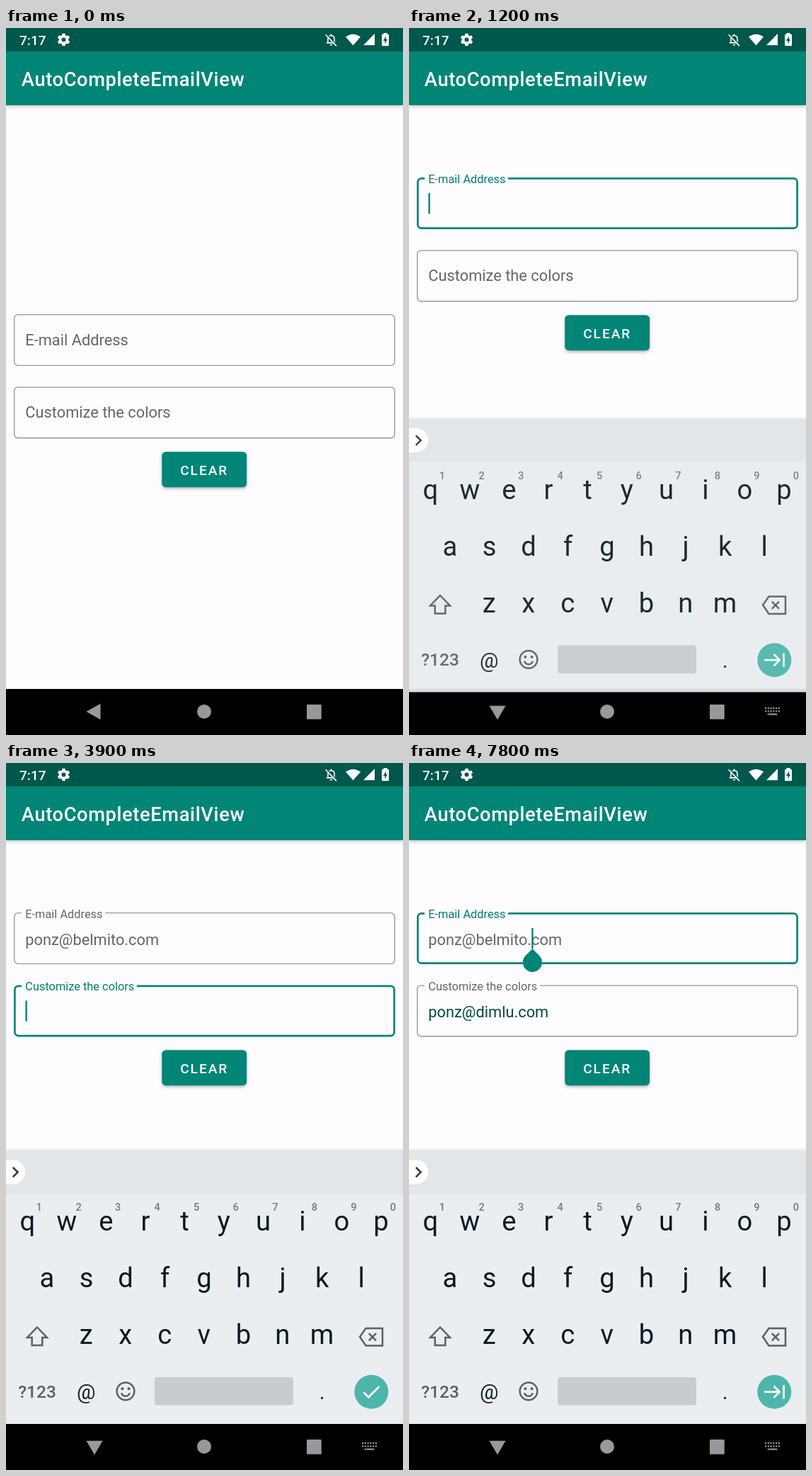
Animation, 561 px wide and 998 px high, one loop 8 s. Source, as an HTML page with a canvas:

```html
<!DOCTYPE html>
<html lang="en">
<head>
<meta charset="utf-8">
<title>AutoCompleteEmailView</title>
<style>
html, body { margin: 0; width: 100%; height: 100%; overflow: hidden; background: #fefcff; }
canvas { display: block; width: 561px; height: 998px; }
</style>
</head>
<body>
<canvas id="stage"></canvas>
<script>
const W = 561, H = 998, LOOP = 8000, STEP = 100;
const TEAL = '#008577', DARK_TEAL = '#00574b', PAPER = '#fefcff';
const GREY = '#666567', LINE = '#979699', ICON = '#566167', NAV = '#9a989c';
const BODY = 21.82, SMALL = 16.36, LEFT = 27.3;
const NAME = 'ponz';
const DOMAINS = ['belmito.com', 'dimlu.com'];

const canvas = document.getElementById('stage');
const ctx = canvas.getContext('2d');
const dpr = window.devicePixelRatio || 1;
canvas.width = W * dpr;
canvas.height = H * dpr;

const lerp = (a, b, p) => a + (b - a) * p;
const mix = (a, b, p) => `rgb(${a.map((v, i) => Math.round(lerp(v, b[i], p)))})`;

// Last value whose time has come
function at(keys, t) {
  let value = keys[0][1];
  for (const [time, v] of keys) if (t >= time) value = v;
  return value;
}

function rect(x, y, w, h, color, r = 0) {
  ctx.fillStyle = color;
  ctx.beginPath();
  ctx.roundRect(x, y, w, h, r);
  ctx.fill();
}

function disc(x, y, r, color) {
  ctx.fillStyle = color;
  ctx.beginPath();
  ctx.arc(x, y, r, 0, Math.PI * 2);
  ctx.fill();
}

function trace(points, closed) {
  ctx.beginPath();
  points.forEach(([x, y], i) => i ? ctx.lineTo(x, y) : ctx.moveTo(x, y));
  if (closed) ctx.closePath();
}

function poly(points, color) {
  trace(points, true);
  ctx.fillStyle = color;
  ctx.fill();
}

function line(points, color, width, closed = false) {
  trace(points, closed);
  ctx.strokeStyle = color;
  ctx.lineWidth = width;
  ctx.stroke();
}

function setFont(size, weight = 400, spacing = 0) {
  ctx.font = `${weight} ${size}px Roboto, sans-serif`;
  ctx.letterSpacing = spacing + 'px';
}

function text(str, x, y, size, color, { weight = 400, align = 'left', spacing = 0 } = {}) {
  setFont(size, weight, spacing);
  ctx.textAlign = align;
  ctx.fillStyle = color;
  ctx.fillText(str, x, y);
}

function widthOf(str, size) {
  setFont(size);
  return ctx.measureText(str).width;
}

function shadow(color, blur, dy) {
  ctx.shadowColor = color;
  ctx.shadowBlur = blur * dpr;
  ctx.shadowOffsetY = dy * dpr;
}
const noShadow = () => shadow('transparent', 0, 0);

function gear(x, y) {
  ctx.save();
  ctx.translate(x, y);
  disc(0, 0, 6.6, '#fff');
  for (let i = 0; i < 6; i++) {
    poly([[-3, -5], [-1.9, -8.8], [1.9, -8.8], [3, -5]], '#fff');
    ctx.rotate(Math.PI / 3);
  }
  disc(0, 0, 3, DARK_TEAL);
  ctx.restore();
}

function bellOff() {
  ctx.save();
  ctx.translate(449.5, 6.3);
  ctx.scale(0.83, 0.83);
  ctx.strokeStyle = '#fff';
  ctx.lineWidth = 1.9;
  ctx.stroke(new Path2D('M6.5 17V11C6.5 7.5 8.8 5.4 12 5.4S17.5 7.5 17.5 11V17M4 17.6H19M12 5V2.6M10 21H14'));
  line([[4, 3], [22, 22]], DARK_TEAL, 2);
  line([[2.5, 3.5], [21, 23]], '#fff', 1.9);
  ctx.restore();
}

function statusBar() {
  rect(0, 0, W, 33, DARK_TEAL);
  text('7:17', 19, 23.6, 19.1, '#fff', { weight: 500 });
  gear(81.5, 16.5);
  bellOff();
  ctx.fillStyle = '#fff';
  ctx.fill(new Path2D('M490.5 24.5L480 12.5Q490.5 4.8 501 12.5Z'));
  poly([[521, 8], [521, 24.3], [505, 24.3]], '#fff');
  rect(533.5, 7, 5, 4, '#fff');
  rect(531, 8.8, 10, 16.4, '#fff', 1);
  poly([[536.8, 11.5], [533, 18], [535.4, 18], [535.4, 22.5], [539, 16], [536.8, 16]], DARK_TEAL);
}

function appBar() {
  shadow('rgba(0,0,0,.22)', 5, 2);
  rect(0, 33, W, 76, TEAL);
  noShadow();
  text('AutoCompleteEmailView', 21.8, 81.5, 27.27, '#fff', { weight: 500, spacing: 0.62 });
}

// Rounded outline; the top edge is open between g1 and g2
function outline(top, focused, g1, g2) {
  const w = focused ? 2.73 : 1.36;
  const x1 = 11 + w / 2, x2 = 550 - w / 2, y1 = top + w / 2, y2 = top + 73 - w / 2, r = 5.2;
  ctx.beginPath();
  ctx.moveTo(g2, y1);
  ctx.arcTo(x2, y1, x2, y2, r);
  ctx.arcTo(x2, y2, x1, y2, r);
  ctx.arcTo(x1, y2, x1, y1, r);
  ctx.arcTo(x1, y1, g1, y1, r);
  ctx.lineTo(g1, y1);
  ctx.strokeStyle = focused ? TEAL : LINE;
  ctx.lineWidth = w;
  ctx.stroke();
}

function field(top, f) {
  const floating = f.lift > 0;
  const gapEnd = floating ? LEFT + widthOf(f.label, SMALL) + 3.6 : 22;
  outline(top, f.focused, 22, gapEnd);

  const labelColor = f.focused ? mix([102, 101, 103], [0, 125, 111], f.lift) : GREY;
  text(f.label, LEFT, top + lerp(44, 8, f.lift), lerp(BODY, SMALL, f.lift), labelColor);

  const base = top + 45.8;
  const typedWidth = widthOf(f.typed, BODY);
  text(f.typed, LEFT, base, BODY, f.color);
  if (f.hint) text(f.hint, LEFT + typedWidth, base, BODY, f.hintColor);
  if (f.underline) rect(LEFT + 0.3, base + 2.2, typedWidth, 1.4, f.color);
  if (f.caret < 0) return;

  const x = LEFT + 1.3 + widthOf(f.typed.slice(0, f.caret), BODY);
  rect(x - 1.2, top + 22, 2.4, 29.3, TEAL);
  if (f.handle) {
    const cy = top + 70.4, r = 13.5;
    ctx.beginPath();
    ctx.moveTo(x, cy - r * Math.SQRT2);
    ctx.arc(x, cy, r, -Math.PI / 4, Math.PI * 1.25);
    ctx.closePath();
    ctx.fillStyle = TEAL;
    ctx.fill();
  }
}

function clearButton(top) {
  shadow('rgba(0,0,0,.3)', 4, 2);
  rect(220.3, top, 119.8, 50, TEAL, 5.4);
  noShadow();
  text('CLEAR', 246.2, top + 32.5, 19.1, '#fff', { weight: 500, spacing: 1.95 });
}

function navBar(open) {
  rect(0, 933, W, 65, '#000');
  disc(280, 965, 10, NAV);
  rect(425, 955, 20.7, 20.7, NAV, 1);
  if (!open) {
    poly([[113.5, 965], [133.5, 953.8], [133.5, 976.2]], NAV);
    return;
  }
  poly([[113.5, 956.8], [136.5, 956.8], [125, 976.5]], NAV);
  for (let i = 0; i < 6; i++) {
    for (const y of [959, 963.3]) rect(503 + i * 3.75, y, 2.2, 2.2, NAV);
  }
  rect(503 + 3.75, 967.6, 2.2, 2.2, NAV);
  rect(509.5, 967.6, 8.4, 2.2, NAV);
  rect(503 + 15, 967.6, 2.2, 2.2, NAV);
}

function keyRow(chars, x, y) {
  [...chars].forEach((c, i) =>
    text(c, x + i * 55.52, y, 38.2, '#0a1a22', { align: 'center' }));
}

function actionKey(done) {
  disc(516.3, 887.7, 24, '#4db6ac');
  if (done) {
    line([[505.5, 888.5], [512.3, 895.3], [527.3, 880.3]], '#fff', 2.7);
  } else {
    line([[502, 887.7], [523, 887.7]], '#fff', 2.7);
    line([[515.5, 879.5], [523.7, 887.7], [515.5, 895.9]], '#fff', 2.7);
    line([[529.5, 878], [529.5, 897.4]], '#fff', 2.7);
  }
}

function smiley(x, y) {
  ctx.strokeStyle = ICON;
  ctx.lineWidth = 2.5;
  ctx.beginPath();
  ctx.arc(x, y, 12.4, 0, Math.PI * 2);
  ctx.stroke();
  disc(x - 4.6, y - 3.6, 2, ICON);
  disc(x + 4.6, y - 3.6, 2, ICON);
  ctx.beginPath();
  ctx.arc(x, y + 1, 6, 0.25, Math.PI - 0.25);
  ctx.stroke();
}

function keyboard(s) {
  shadow('rgba(0,0,0,.12)', 4, -1);
  rect(0, 547, W, 386, '#ebeef1');
  noShadow();
  rect(0, 547, W, 61, '#e2e6e8');
  rect(-20, 560.5, 47.3, 34, '#fff', 17);
  line([[9.8, 570.8], [16.6, 577.6], [9.8, 584.4]], '#2b383e', 2.6);
  if (s.word) text(s.word, 279, 587, 24.5, '#6a7277', { align: 'center' });

  keyRow('qwertyuiop', 30.3, 660);
  keyRow('asdfghjkl', 58, 740);
  keyRow('zxcvbnm', 113.3, 820);
  [...'1234567890'].forEach((c, i) =>
    text(c, 47 + i * 55.55, 632, 14.6, '#737a7f', { weight: 500, align: 'center' }));

  line([[44, 796.5], [58, 811], [51.3, 811], [51.3, 822], [36.7, 822], [36.7, 811], [30, 811]], ICON, 2.5, true);
  line([[500, 810], [508.5, 798], [532, 798], [532, 822.5], [508.5, 822.5]], ICON, 2.5, true);
  line([[512.8, 805.2], [523, 815.4]], ICON, 2.5);
  line([[523, 805.2], [512.8, 815.4]], ICON, 2.5);

  text('?123', 44, 895.7, 24.5, ICON, { weight: 500, align: 'center' });
  text('@', 113.3, 898, 29.5, '#15242b', { align: 'center' });
  smiley(169, 886.8);
  rect(210, 867, 196, 39.5, '#c8ccd0', 4);
  text('.', 446.7, 898, 30, '#15242b', { align: 'center' });
  actionKey(s.done);

  if (s.popup) {
    shadow('rgba(0,0,0,.25)', 4, 1);
    rect(86, 762, 55, 159, '#fcfdfd', 6);
    noShadow();
    text('@', 113.3, 812, 35, '#15242b', { align: 'center' });
  }
}

const typing = (start, now) => at([
  [0, ''], [start, NAME.slice(0, 1)], [start + 200, NAME.slice(0, 2)],
  [start + 300, NAME.slice(0, 3)], [start + 800, NAME]
], now);

function suggest(typed) {
  const i = typed.indexOf('@');
  if (i < 0) return '';
  const part = typed.slice(i + 1);
  return DOMAINS.find(d => d.startsWith(part)).slice(part.length);
}

// A label begins its rise just before the tap becomes visible
const lift = (start, t) => t < start ? 0 : Math.min(1, 0.54 + (t - start) / 167);

function scene(t) {
  const active = at([[0, 0], [1000, 1], [3600, 2], [7200, 1]], t);
  let first = at([[0, typing(1600, t)], [2800, NAME + '@'], [3600, `${NAME}@${DOMAINS[0]}`]], t);
  let second = at([[0, typing(4400, t)], [5600, NAME + '@'], [5700, NAME + '@d'],
    [7200, `${NAME}@${DOMAINS[1]}`]], t);
  const current = active === 1 ? first : active === 2 ? second : '';
  const composing = current !== '' && !current.includes('@');
  const back = t >= 7200;
  return {
    open: t >= 1100,
    word: composing ? current : '',
    done: t >= 3600 && t < 7200,
    popup: (t >= 2800 && t < 3400) || (t >= 5600 && t < 6300),
    fields: [
      {
        label: 'E-mail Address', typed: first, hint: active === 1 ? suggest(first) : '',
        focused: active === 1, lift: lift(1000, t), color: GREY, hintColor: '#9d9c9e',
        underline: active === 1 && composing,
        caret: active !== 1 ? -1 : back ? first.length - 3 : first.length,
        handle: t >= 7300
      },
      {
        label: 'Customize the colors', typed: second, hint: active === 2 ? suggest(second) : '',
        focused: active === 2, lift: lift(3600, t), color: '#00493f', hintColor: TEAL,
        underline: active === 2 && composing,
        caret: active === 2 && t < 6700 ? second.length : -1
      }
    ]
  };
}

function draw(now) {
  const t = Math.floor(now % LOOP / STEP) * STEP;
  const s = scene(t);
  const shift = s.open ? 193 : 0;
  ctx.setTransform(dpr, 0, 0, dpr, 0, 0);
  rect(0, 0, W, H, PAPER);
  appBar();
  statusBar();
  clearButton(598.2 - shift);
  field(506.4 - shift, s.fields[1]);
  field(404 - shift, s.fields[0]);
  navBar(s.open);
  if (s.open) {
    const k = Math.max(0, (1300 - t) / 200);
    ctx.save();
    ctx.globalAlpha = 1 - 0.6 * k ** 3;
    ctx.translate(0, 18 * k * k);
    keyboard(s);
    ctx.restore();
  }
}

const begin = performance.now();
function tick() {
  draw(performance.now() - begin);
  requestAnimationFrame(tick);
}
tick();
</script>
</body>
</html>
```
